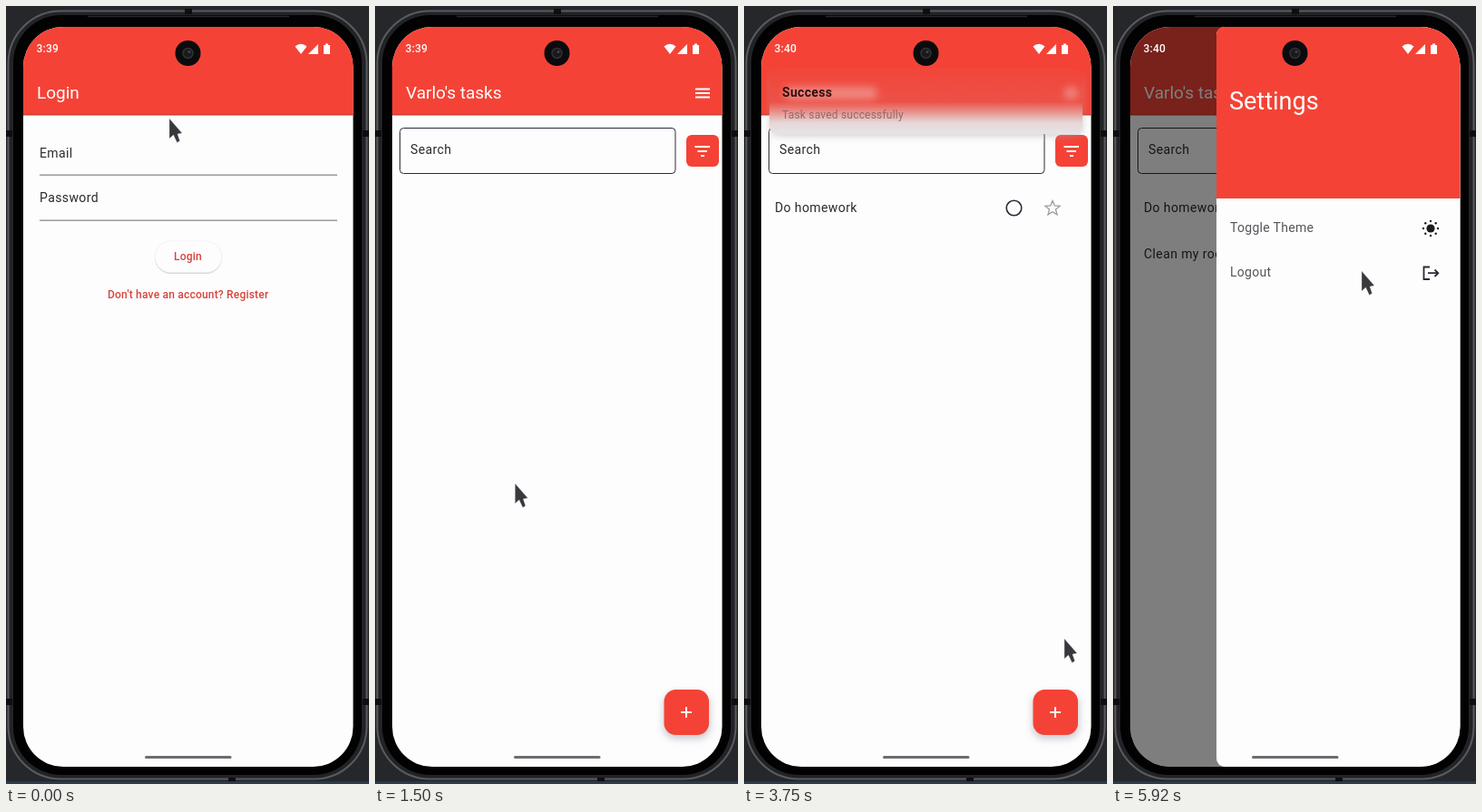
Write an HTML page that moves like this. It is 400x857 px and loops after 6000 ms.

```html
<!DOCTYPE html>
<html lang="en">
<head>
<meta charset="utf-8">
<title>Task app walkthrough</title>
<style>
  html, body { margin: 0; width: 100%; height: 100%; overflow: hidden; background: #25272b; }
  svg { display: block; width: 400px; height: 857px; }
  text { font: 14px Roboto, sans-serif; letter-spacing: .4px; fill: #2b2a2f; white-space: pre; }
  .bar { font-size: 19px; letter-spacing: 0; fill: #fff; }
  .big { font-size: 27px; letter-spacing: 0; fill: #fff; }
  .btn { font-size: 12px; font-weight: 500; letter-spacing: .2px; fill: #d8423a; }
  .lite { fill: #fff; }
  .tiny { font-size: 9.5px; letter-spacing: .2px; fill: #ee6a62; }
  .soft { fill: #55545a; letter-spacing: .3px; }
  .head { font-weight: 700; letter-spacing: .3px; fill: #2e0f0e; }
  .note { font-size: 12px; letter-spacing: .2px; fill: #8f6a6a; }
  .line { fill: none; stroke: #2b2a35; }
  .white { fill: none; stroke: #fff; stroke-width: 2; }
</style>
</head>
<body>
<svg viewBox="0 0 400 857">
  <defs>
    <clipPath id="screen"><rect x="19" y="23" width="363.5" height="815" rx="44"/></clipPath>
    <radialGradient id="glow">
      <stop offset=".3" stop-color="#dcdce4"/>
      <stop offset="1" stop-color="#fdfdff" stop-opacity="0"/>
    </radialGradient>
    <linearGradient id="glass" x2="0" y2="1">
      <stop offset="0" stop-color="#f2463a"/>
      <stop offset=".5" stop-color="#ec5147"/>
      <stop offset=".66" stop-color="#e8928d"/>
      <stop offset=".82" stop-color="#e6d6d6"/>
      <stop offset="1" stop-color="#e6e4e6"/>
    </linearGradient>
    <filter id="blur" x="-50%" y="-50%" width="200%" height="200%"><feGaussianBlur stdDeviation="4"/></filter>
  </defs>
  <g id="phone"></g>
  <g id="app" clip-path="url(#screen)"></g>
  <g id="top"></g>
</svg>
<script>
const RED = '#f44336', PAPER = '#fdfdfe', INK = '#2b2a35', DARK = '#1b1b1e';
const RULE = '#8b8a92', ACTIVE = '#ee8a80';
const STEPS = 72, LOOP = 6000;
const $ = id => document.getElementById(id);

const text = (x, y, s, cls = '', id = '') => `<text x="${x}" y="${y}" class="${cls}" id="${id}">${s}</text>`;
const box = (x, y, w, h, fill, rx = 0, extra = '') =>
  `<rect x="${x}" y="${y}" width="${w}" height="${h}" rx="${rx}" fill="${fill}" ${extra}/>`;
const disc = (x, y, r, fill, extra = '') => `<circle cx="${x}" cy="${y}" r="${r}" fill="${fill}" ${extra}/>`;
const path = (d, cls = '', extra = '') => `<path d="${d}" class="${cls}" ${extra}/>`;
const group = (id, ...parts) => `<g id="${id}">${parts.join('')}</g>`;
const rule = (y, color, id = '') => box(37, y, 328, 1.3, color, 0, `id="${id}"`);
const pill = (x, w, y, h, fill) =>
  box(x, y + 1, w, h, '#d9d8dc', h / 2) + box(x, y, w, h - .5, fill, h / 2, 'stroke="#ebeaee" stroke-width=".7"');
const header = () => box(19, 23, 364, 97, RED) + box(19, 119, 364, 1.5, '#d43a30');

function ring(n, r1, r2, cx, cy, turn = -Math.PI / 2) {
  return Array.from({ length: n }, (_, i) => {
    const a = turn + i * 2 * Math.PI / n, r = i % 2 ? r2 : r1;
    return [cx + r * Math.cos(a), cy + r * Math.sin(a)].map(v => v.toFixed(1)).join(' ');
  });
}

const star = y => path('M' + ring(10, 8.5, 3.7, 340, y + 1).join('L') + 'Z', '', 'fill="none" stroke="#9b9a9f" stroke-width="1.3"');
const row = (i, id) => {
  const y = 222 + 51 * i;
  return text(34, y + 5, '', '', id) + disc(297.5, y + .5, 8.3, 'none', `stroke="${INK}" stroke-width="1.6"`) + star(y);
};
const sunRays = ring(8, 8, 8, 350, 245).map(p => { const [x, y] = p.split(' '); return disc(x, y, 1.2, DARK); }).join('');

$('phone').innerHTML =
  box(0, 854, 400, 3, '#2c3a4a') +
  box(2.5, 5.5, 395, 846, '#222326', 58, 'stroke="#5a5b5e" stroke-width="2"') +
  box(8, 10, 384, 837, '#020203', 53) +
  path('M90 11.5H312', '', 'stroke="#29292c" stroke-width="1.5"') +
  box(197, 3, 8, 6, '#0e0e10') + box(245, 850, 8, 4, '#0e0e10') +
  [137, 763].map(y => box(0, y, 7, 7, '#0e0e10') + box(393, y, 7, 7, '#0e0e10')).join('');

$('app').innerHTML = box(19, 23, 364, 815, PAPER) +
  group('login',
    header(), text(34, 102, 'Login', 'bar'),
    text(37, 167, 'Email', '', 'email'), rule(185.5, RULE, 'emailLine'),
    text(37, 216, 'Password', '', 'pass'), rule(235.5, RULE, 'passLine'),
    pill(164, 74, 259, 35, PAPER), text(185, 280, 'Login', 'btn'),
    text(112, 322, "Don't have an account? Register", 'btn')) +
  group('list',
    header(), text(34, 102, "Varlo's tasks", 'bar'),
    path('M353 91.5H369M353 96H369M353 100.5H369', 'white', 'stroke-width="1.8"'),
    box(27.5, 134.5, 303.5, 50, PAPER, 4, `stroke="${INK}"`), text(39, 163, 'Search'),
    box(343, 142, 36, 35, RED, 6),
    path('M352.5 155H369M355.5 160H366M359 165H363', 'white'),
    disc(340, 222, 18, '#e2e1e5', 'id="ripple"'),
    group('row1', row(0, 'name1')), group('row2', row(1, 'name2')),
    box(318, 757, 51, 50, '#c9c8cd', 13, 'filter="url(#blur)"'),
    box(318.5, 753, 49.5, 50, RED, 13), path('M337 778H349M343 772V784', 'white'),
    group('toast',
      box(29, 76, 344, 67, '#a9a3a6', 8, 'filter="url(#blur)" opacity=".5"'),
      box(28, 70, 345, 71, 'url(#glass)', 9),
      box(44, 89, 103, 14, '#f09a93', 7, 'filter="url(#blur)" opacity=".75"'),
      box(353, 89, 15, 14, '#f09a93', 7, 'filter="url(#blur)" opacity=".75"'),
      text(42, 100, 'Success', 'head'), text(42, 124, 'Task saved successfully', 'note'))) +
  group('task',
    header(), text(34, 102, 'Task', 'bar'),
    text(37, 153, 'Title', 'tiny'), text(37, 174, '', '', 'title'), rule(185.3, ACTIVE),
    box(37.5, 202, 327, 133.5, PAPER, 5, `stroke="${INK}" stroke-width="1.2"`),
    text(48, 231, 'Description'),
    pill(120, 83, 353, 36, PAPER), text(142, 375, 'Cancel', 'btn'),
    box(211, 353, 69, 36, RED, 18), text(232, 375, 'Save', 'btn lite'),
    disc(64, 784, 58, 'url(#glow)'), box(19, 816, 120, 22, PAPER), disc(51, 791, 25, '#fff'),
    path('M43 786.5H59M43 791H59M43 795.5H59', 'line', 'stroke-width="1.6"')) +
  group('drawer',
    box(19, 23, 364, 815, '#000', 0, 'opacity=".5"'),
    box(114, 23, 277, 815, PAPER, 9),
    path('M114 212V32Q114 23 123 23H383V212Z', '', `fill="${RED}"`),
    text(128, 114, 'Settings', 'big'),
    box(114, 213, 266, 57, '#efeff1', 0, 'id="hover"'),
    text(129, 249, 'Toggle Theme', 'soft'), disc(350, 245, 4.6, DARK), sunRays,
    text(129, 298, 'Logout', 'soft'),
    path('M349 287.5H342.5V301H349M347 294.2H358M354.5 290.5L358.3 294.2L354.5 298', 'line', 'stroke-width="1.8"'));

$('top').innerHTML =
  text(33.5, 51, '', 'btn lite', 'clock') +
  path('M318.5 44.5Q325 39 331.5 44.5L325 53ZM333 53L344 42V53ZM350 43H352V41.5H355V43H357V53H350Z', '', 'fill="#fff"') +
  disc(200.5, 52, 14, '#0b0b0d') + disc(200.5, 52, 5.5, '#1a1a1d', 'stroke="#313136" stroke-width="1.5"') + disc(202, 50.5, 1.5, '#434349') +
  box(153, 826, 95.5, 3, '#6d6c72', 1.5) +
  `<g id="mouse">${path('M0 0V22L4.5 18L8.5 26.5L11.5 24.5L9 17L14 16Z', '', 'fill="#39393d" stroke="#d8d8dc" stroke-opacity=".5" stroke-width=".7"')}</g>`;

// Pages and overlays by step: [from, until]
const spans = {
  login: [[0, 9]],
  list: [[9, 21], [30, 47], [54, 72]],
  task: [[21, 30], [47, 54]],
  drawer: [[14, 18], [69, 72]],
  toast: [[30, 35], [42, 47], [54, 60]],
  ripple: [[37, 41]],
  hover: [[15, 18]],
  row1: [[30, 72]],
  row2: [[54, 72]],
  mouse: [[0, 54], [57, 72]]
};

const route = [
  [0, 180, 124], [2, 110, 160], [4, 110, 160], [5, 110, 210], [6, 110, 210], [8, 200, 276],
  [9, 200, 276], [13, 361, 97], [14, 361, 97], [16, 167, 235], [17, 60, 400], [20, 343, 778],
  [22, 138, 172], [25, 138, 172], [26, 138, 220], [29, 245, 370], [33, 245, 370], [37, 340, 222],
  [39, 223, 220], [41, 297, 222], [43, 297, 222], [45, 353, 697], [46, 343, 776],
  [48, 138, 172], [51, 138, 172], [53, 245, 370], [57, 245, 370], [60, 361, 160],
  [63, 361, 160], [67, 361, 97], [69, 361, 97], [71, 274, 292], [72, 274, 292]
];

function cursorAt(s) {
  const i = route.findIndex(p => p[0] > s);
  const [t0, x0, y0] = route[i - 1], [t1, x1, y1] = route[i];
  const u = (s - t0) / (t1 - t0);
  return [x0 + (x1 - x0) * u, y0 + (y1 - y0) * u];
}

const typed = (s, from, word, steps) => word.slice(0, Math.max(0, Math.ceil((s - from) / steps * word.length)));

function focus(id, on, y) {
  $(id).setAttribute('class', on ? 'tiny' : '');
  $(id).setAttribute('y', on ? y - 14 : y);
  $(id + 'Line').setAttribute('fill', on ? ACTIVE : RULE);
}

function draw(s) {
  for (const id in spans) {
    const on = spans[id].some(([a, b]) => s >= a && s < b);
    $(id).style.display = on ? '' : 'none';
  }
  const home = 'Do homework', room = 'Clean my room';
  const roomFirst = s >= 54 && s < 62;
  $('name1').textContent = roomFirst ? room : home;
  $('name2').textContent = roomFirst ? home : room;
  $('title').textContent = s < 40 ? typed(s, 21, home, 4) : typed(s, 47, room, 4);
  $('clock').textContent = s < 22 ? '3:39' : '3:40';
  focus('email', s >= 3 && s < 5, 167);
  focus('pass', s >= 5 && s < 8, 216);
  $('mouse').setAttribute('transform', `translate(${cursorAt(s)})`);
}

let last = -1;
function tick() {
  const t = performance.now() % LOOP;
  const s = Math.floor((t + 4) / LOOP * STEPS) % STEPS;
  if (s !== last) draw(last = s);
  requestAnimationFrame(tick);
}
tick();
</script>
</body>
</html>
```
